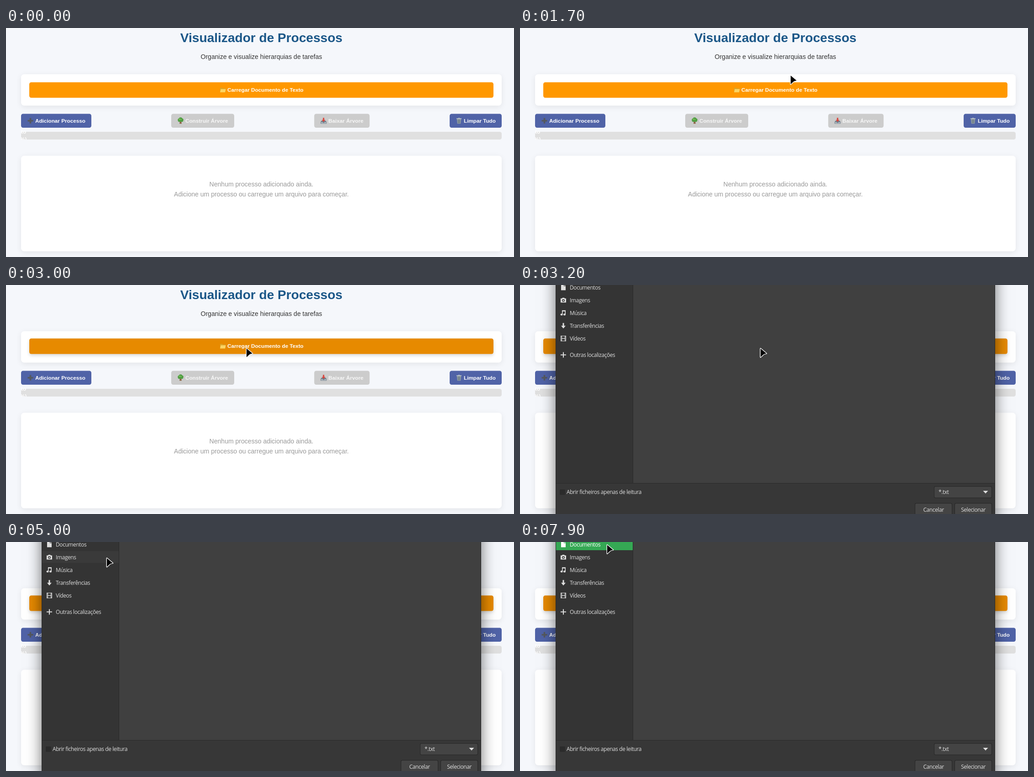
An HTML page with a canvas that plays this animation: 1113 by 503 pixels, repeating every 8000 ms.

```html
<!DOCTYPE html>
<html lang="pt">
<head>
<meta charset="utf-8">
<title>Visualizador de Processos</title>
<style>
html, body { margin: 0; width: 100%; height: 100%; overflow: hidden; background: #f5f7fb; }
canvas { display: block; }
</style>
</head>
<body>
<canvas id="stage" width="1113" height="503"></canvas>
<script>
const ctx = document.getElementById('stage').getContext('2d');
const LOOP = 8000, TICK = 100;
const PAGE = '"Liberation Sans", Arial, sans-serif';
const DIALOG = '"Open Sans", "Noto Sans", sans-serif';
const BLUE = '#5063a7', GREY = '#cccccc', LIGHT = '#dedede';

// Pointer path: time, x, y
const PATH = [
  [200, 370, 3], [300, 402, 46], [600, 402, 46], [800, 445, 93], [1000, 528, 147],
  [1100, 561, 155], [1300, 586, 137], [1500, 594, 106], [1700, 592, 103],
  [1900, 571, 148], [2000, 556, 164], [2200, 537, 154], [2400, 525, 139],
  [2600, 526, 138], [4100, 526, 138], [4400, 332, 103], [4600, 332, 103],
  [4900, 237, 45], [5000, 220, 34], [5100, 215, 23], [5300, 232, 63],
  [5500, 232, 63], [5800, 200, 20], [6000, 190, 2], [6600, 190, 2],
  [6800, 187, 4], [7800, 187, 4], [7900, 190, 5]
];
// Hover amount of the load button: time, amount
const HOVER = [
  [900, 0], [1300, 1], [1400, 1], [1650, 0], [1750, 0], [1950, .7],
  [2000, .7], [2150, 0], [2200, 0], [2400, 1]
];

function sample(keys, t) {
  if (t <= keys[0][0]) return keys[0].slice(1);
  for (let i = 1; i < keys.length; i++) {
    const a = keys[i - 1], b = keys[i];
    if (t <= b[0]) {
      const k = (t - a[0]) / (b[0] - a[0]);
      return a.slice(1).map((v, j) => v + (b[j + 1] - v) * k);
    }
  }
  return keys[keys.length - 1].slice(1);
}

function box(x, y, w, h, r, fill, shadow) {
  ctx.save();
  if (shadow) {
    ctx.shadowColor = `rgba(0,0,0,${shadow[0]})`;
    ctx.shadowBlur = shadow[1];
    ctx.shadowOffsetY = shadow[2];
  }
  ctx.fillStyle = fill;
  ctx.beginPath();
  ctx.roundRect(x, y, w, h, r);
  ctx.fill();
  ctx.restore();
}

function text(str, x, y, size, color, { family = PAGE, weight = 'normal', align = 'left', spacing = '0px' } = {}) {
  ctx.font = `${weight} ${size}px ${family}`;
  ctx.letterSpacing = spacing;
  ctx.textAlign = align;
  ctx.fillStyle = color;
  ctx.fillText(str, x, y);
}

const ui = (str, x, y, align = 'left', color = LIGHT) =>
  text(str, x, y, 12, color, { family: DIALOG, align, spacing: '-0.43px' });
const label = (str, x, y, color = '#fff') => text(str, x, y, 11.7, color, { weight: 'bold' });

function shape(d, fill, x = 0, y = 0) {
  ctx.save();
  ctx.translate(x, y);
  ctx.fillStyle = fill;
  ctx.fill(new Path2D(d), 'evenodd');
  ctx.restore();
}

function line(d, color, width, x = 0, y = 0) {
  ctx.save();
  ctx.translate(x, y);
  ctx.strokeStyle = color;
  ctx.lineWidth = width;
  ctx.lineJoin = 'round';
  ctx.stroke(new Path2D(d));
  ctx.restore();
}

// Button pictograms, drawn around their centre
const pictograms = {
  folder(x, y) {
    shape('M-6 -5h5l1.5 1.5h5.5v8h-12z', '#d9a329', x, y);
    shape('M-4.5 -2h11l-1.5 7h-11z', '#fcd462', x, y);
  },
  plus(x, y) {
    shape('M-1.8 -6h3.6v4.2h4.2v3.6h-4.2v4.2h-3.6v-4.2h-4.2v-3.6h4.2z', '#55595f', x, y);
  },
  tree(x, y) {
    shape('M-1.5 1h3l1 5.5h-5z', '#8d6547', x, y);
    shape('M-6 -1a3 3 0 0 1 2-4a4.5 4.5 0 0 1 8 0a3 3 0 0 1 2 4a3 3 0 0 1-4 3.3h-4a3 3 0 0 1-4-3.3z', '#4f9d43', x, y);
    shape('M-4 -2a2 2 0 0 1 4-1.5a2 2 0 0 1 3 1.5z', '#79bd57', x, y);
  },
  inbox(x, y) {
    shape('M-5 0h10l1.5 3v3.5h-13v-3.5z', '#6f7d89', x, y);
    shape('M-5.5 3h3l1 1.5h3l1-1.5h3v2.7h-11z', '#b8c1c8', x, y);
    shape('M-1.5 -6.5h3v4.5h2.5l-4 4.5l-4-4.5h2.5z', '#d9453d', x, y);
  },
  bin(x, y) {
    shape('M-4.8 -4h9.6l-1.2 10.5h-7.2z', '#8e9ba4', x, y);
    line('M-2 -2.5l.5 8M0 -2.5v8M2 -2.5l-.5 8', '#5f7079', .8, x, y);
    shape('M-5.5 -5.5h4v-1h3v1h4v1.7h-11z', '#b5c0c7', x, y);
  }
};

function button(x, w, color, icon, str, ink) {
  box(x, 188.5, w, 30.5, 4.4, color);
  pictograms[icon](x + 20.5, 203.7);
  label(str, x + 31, 208, ink);
}

function drawPage(hover) {
  ctx.fillStyle = '#f5f7fb';
  ctx.fillRect(0, 0, 1113, 503);
  text('Visualizador de Processos', 559.5, 31, 28.08, '#1b5788', { weight: 'bold', align: 'center' });
  text('Organize e visualize hierarquias de tarefas', 559.5, 67.5, 14.04, '#333', { align: 'center' });

  const soft = [.08, 13, 3];
  box(33, 101.5, 1053, 69, 7, '#fff', soft);
  const y = 119.2 - 1.75 * hover;
  const mix = (a, b) => Math.round(a + (b - a) * hover);
  box(51, y, 1017, 34, 4.4, `rgb(${mix(255, 231)},${mix(152, 138)},0)`, [.15 * hover, 7, 3.5]);
  pictograms.folder(475, y + 17);
  label('Carregar Documento de Texto', 485, y + 21);

  button(33, 154, BLUE, 'plus', 'Adicionar Processo');
  button(362, 138, GREY, 'tree', 'Construir Árvore', '#f7f7f7');
  button(675.3, 121.3, GREY, 'inbox', 'Baixar Árvore', '#f7f7f7');
  button(972, 114, BLUE, 'bin', 'Limpar Tudo');

  box(33, 228, 1053, 17, 4.4, '#e0e0e0');
  ctx.save();
  ctx.beginPath();
  ctx.rect(33, 222, 20, 23);
  ctx.clip();
  label('to', 33, 232);
  label('%)', 31, 248);
  ctx.restore();

  box(33, 280.5, 1053, 210, 7, '#fff', soft);
  text('Nenhum processo adicionado ainda.', 559.5, 348, 14.04, '#999', { align: 'center' });
  text('Adicione um processo ou carregue um arquivo para começar.', 559.5, 370, 14.04, '#999', { align: 'center' });
}

// Sidebar rows: label, vertical centre, icon path around its centre
const ROWS = [
  ['Documentos', 6, 'M-5 -7h6v4h4v9h-10zM2 -7l3 3h-3z'],
  ['Imagens', 34, 'M-6 -4h3l1-1.5h4l1 1.5h3v9h-12zM-3 .5a3 3 0 1 0 6 0a3 3 0 1 0-6 0zM-1.5 .5a1.5 1.5 0 1 0 3 0a1.5 1.5 0 1 0-3 0z'],
  ['Música', 62, 'M-3 -6h8v9.5a2.5 2 0 1 1-1.6-2v-5h-4.8v7a2.5 2 0 1 1-1.6-2z'],
  ['Transferências', 90, 'M-1.5 -6h3v6h3.5l-5 6l-5-6h3.5z'],
  ['Vídeos', 118, 'M-6 -6h12v12h-12zM-3 -5h6v4.3h-6zM-3 .7h6v4.3h-6zM-5 -4h1v2h-1zM-5 -1h1v2h-1zM-5 2h1v2h-1zM4 -4h1v2h-1zM4 -1h1v2h-1zM4 2h1v2h-1z'],
  ['Outras localizações', 154, 'M-1 -6h2v5h5v2h-5v5h-2v-5h-5v-2h5z']
];

function control(x, y, w, h) {
  box(x, y, w, h, 3, '#272727');
  box(x + 1, y + 1, w - 2, h - 2, 2.5, '#444444');
}

function drawDialog(t, px, py) {
  box(78, -40, 963, 600, 0, '#404040', [.55, 30, 4]);
  ctx.fillStyle = '#343434';
  ctx.fillRect(79, 0, 168, 435);
  ctx.fillStyle = '#373737';
  ctx.fillRect(79, 436, 962, 67);
  ctx.fillStyle = '#292929';
  ctx.fillRect(78, 0, 1, 503);
  ctx.fillRect(247, 0, 1, 435);
  ctx.fillRect(79, 435, 962, 1);
  ctx.fillRect(1040, 0, 1, 503);

  ROWS.forEach(([name, y, icon], i) => {
    const picked = i === 0 && t >= 7000;
    const over = px < 247 && py >= y - 14 && py < y + 13;
    if (picked || over) {
      ctx.fillStyle = picked ? '#35a854' : '#3a3a3a';
      ctx.fillRect(79, y - 14, 168, 26);
    }
    const ink = i === 0 && t >= 6700 ? '#fff' : LIGHT;
    shape(icon, ink, 95, y - .5);
    ui(name, 109, y + 4, 'left', ink);
  });

  box(87, 449, 12, 12, 2, '#2b2b2b');
  ui('Abrir ficheiros apenas de leitura', 102, 459);
  control(907, 442, 127, 26);
  ui('*.txt', 917, 459);
  shape('M1014.5 452h11l-5.5 6z', LIGHT);
  control(865, 479, 82, 30);
  control(952, 479, 82, 30);
  ui('Cancelar', 906, 498, 'center');
  ui('Selecionar', 993, 498, 'center');
}

const ARROW = 'M1 1.5L14 12.5Q8 13 6 16L1 20.5Z';
const HAND = 'M-2 2Q-.5 .5 1 2L1.5 6L8 7.5Q9.5 8 9 10.5L7.5 14V17H-.5V15L-5 10.5Q-5.5 8 -3.5 8.5L-1.5 10Z';

function drawPointer(d, x, y) {
  line(d, '#fff', 2.6, x, y);
  shape(d, '#000', x, y);
}

function draw(now) {
  const t = Math.floor((now % LOOP) / TICK) * TICK;
  const [x, y] = sample(PATH, t);
  const [hover] = sample(HOVER, t);
  drawPage(hover);
  if (t >= 3200) drawDialog(t, x, y);
  if (t >= 200) drawPointer(hover > 0 && y > 118 && t < 3000 ? HAND : ARROW, x, y);
}

let start;
function loop(now) {
  start ??= now;
  draw(now - start);
  requestAnimationFrame(loop);
}
requestAnimationFrame(loop);
</script>
</body>
</html>
```
